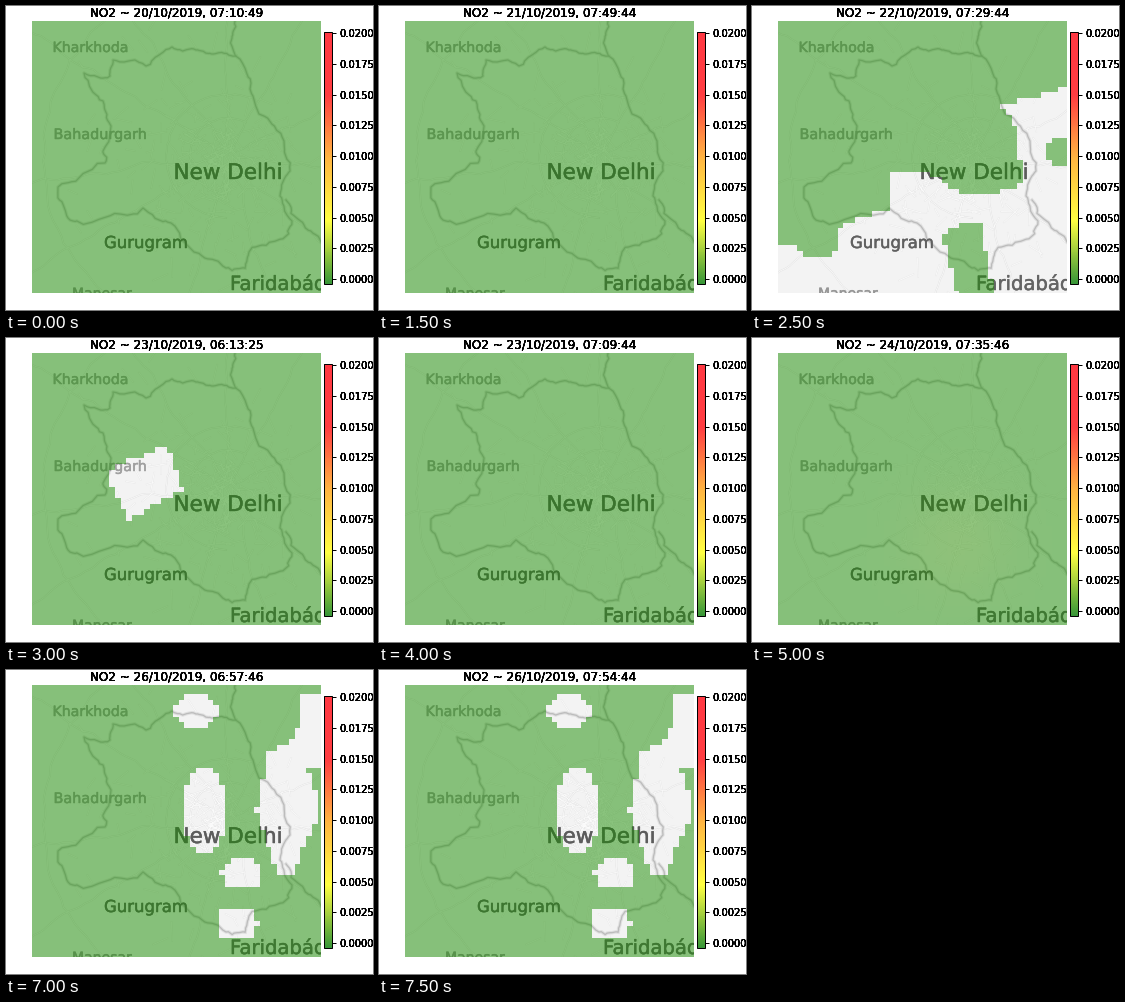
A matplotlib script that plays this animation: 367x304 px, repeating every 8 s.

```python
import numpy as np
import matplotlib.pyplot as plt
from matplotlib.animation import FuncAnimation
from matplotlib.cm import ScalarMappable
from matplotlib.colors import LinearSegmentedColormap, Normalize
from matplotlib.path import Path
from matplotlib.patheffects import withStroke

W, H, DPI = 367, 304, 72
X0, X1, Y0, Y1 = 26, 315, 15, 287
CENTRE = np.array([222, 150])

plt.rcParams["font.family"] = "DejaVu Sans"
fig = plt.figure(figsize=(W / DPI, H / DPI), dpi=DPI, facecolor="white")
rng = np.random.default_rng(7)


def px_axes(x, y, w, h):
    return fig.add_axes([x / W, 1 - (y + h) / H, w / W, h / H])


def heavy(x, y, s, **kw):
    """Stacked copies of a label harden its soft edges."""
    return [fig.text(x / W, 1 - y / H, s, color="black", **kw) for _ in range(7)]


def gray(v):
    return (v / 255,) * 3


# ---- base map ----
ax = px_axes(X0, Y0, X1 - X0, Y1 - Y0)
ax.set_xlim(X0, X1)
ax.set_ylim(Y1, Y0)
ax.axis("off")
ax.fill([X0, X1, X1, X0], [Y0, Y0, Y1, Y1], color=gray(243), lw=0)


def wander(pts, amp, depth=3):
    """Roughen a polyline by repeated midpoint displacement."""
    pts = np.array(pts, float)
    for _ in range(depth):
        a, b = pts[:-1], pts[1:]
        reach = np.hypot(*(b - a).T)[:, None]
        mid = (a + b) / 2 + rng.normal(0, amp, a.shape) * reach
        pts = np.vstack([np.stack([a, mid], 1).reshape(-1, 2), pts[-1:]])
    return pts


def cased(pts, edge, edge_lw, core, core_lw, z=1):
    for tone, lw, dz in ((edge, edge_lw, 0), (core, core_lw, 0.5)):
        ax.plot(*np.transpose(pts), color=gray(tone), lw=lw, zorder=z + dz,
                solid_joinstyle="round")


def polar(r, angle):
    return np.stack([r * np.cos(angle), r * np.sin(angle)], -1)


# streets: short pieces scattered around the centre, on a few bearings
for spread, count in ((30, 170), (70, 150)):
    for mid in rng.normal(CENTRE + (0, 10), spread, (count, 2)):
        step = polar(rng.uniform(3, 10), rng.choice([0.35, 1.1, 1.9, 2.7])
                     + rng.normal(0, 0.2))
        cased([mid - step, mid + step], 232, 1.5, 253, 0.7)

# trunk roads: spokes and rings
for angle in np.linspace(0, 2 * np.pi, 11, endpoint=False) + 0.2:
    r = np.linspace(10, 260, 6)[:, None]
    spoke = CENTRE + r * polar(1, angle + rng.normal(0, 0.1))
    cased(wander(spoke, 0.05), 226, 1.6, 252, 0.7)
for radius in (38, 62, 185):
    ring = CENTRE + polar(radius, np.linspace(1.6, 5.2, 20))
    cased(wander(ring, 0.04, 2), 226, 1.6, 252, 0.7)

# state border and river
west_side = [(230, 50), (207, 48), (190, 44), (166, 41), (140, 60), (107, 54),
             (104, 70), (78, 67), (97, 95), (105, 120), (97, 145), (99, 157),
             (52, 181), (62, 212), (100, 211), (137, 202), (165, 217),
             (188, 246), (220, 262), (239, 262)]
east_side = [(239, 262), (243, 246), (265, 236), (286, 215), (274, 190),
             (284, 165), (278, 135), (253, 108), (241, 68), (226, 32), (229, 15)]
river = [(280, 194), (298, 219), (315, 236)]
for course in (west_side, east_side, river):
    cased(wander(course, 0.09), 224, 3.4, 188, 1.3, z=3)

for s, x, y, size, tone in [
        ("Kharkhoda", 46.5, 46, 14.1, 160), ("Bahadurgarh", 47.5, 133, 14.4, 160),
        ("New Delhi", 167.5, 173, 21.5, 92), ("Gurugram", 98, 242, 16.5, 96),
        ("Faridabád", 224, 284, 19.6, 100), ("Manesar", 66, 292, 14, 150)]:
    bold = withStroke(linewidth=0.5, foreground=gray(tone))
    ax.text(x, y, s, size=size, color=gray(tone), va="baseline", clip_on=True,
            zorder=5, path_effects=[bold])

# ---- measured layer, sampled on coarse cells ----
gx, gy = np.meshgrid(np.arange(X0, X1) + 0.5, np.arange(Y0, Y1) + 0.5)
CW, CH = 5.8, 5.67
cx = (np.floor((gx - 27.6) / CW) + 0.5) * CW + 27.6
cy = (np.floor((gy - 18.3) / CH) + 0.5) * CH + 18.3
cells = np.column_stack([cx.ravel(), cy.ravel()])


def area(*pts):
    return Path(pts).contains_points(cells).reshape(gx.shape)


def blob(x, y, rx, ry):
    return np.abs((cx - x) / rx) ** 2.5 + np.abs((cy - y) / ry) ** 2.5 < 1


def layer(gap=False, tint=0.0):
    """Half-clear green with gaps and a warm haze in the south."""
    warm = tint * np.exp(-((cx - 205) / 55) ** 2 - ((cy - 205) / 55) ** 2)
    rgba = np.zeros(gx.shape + (4,))
    rgba[..., 0] = 25 / 255 + warm
    rgba[..., 1] = 141 / 255 + warm * 0.2
    rgba[..., 3] = np.where(gap, 0, 0.5)
    return rgba


south = area((20, 239), (42, 240), (52, 253), (84, 247), (90, 218), (135, 204),
             (140, 166), (170, 163), (210, 188), (238, 190), (270, 178),
             (266, 128), (250, 100), (320, 80), (320, 295), (20, 295))
south &= ~area((190, 230), (213, 217), (228, 219), (243, 295), (207, 295))
south &= ~blob(308, 146, 13, 15)
west = area((100, 134), (160, 106), (177, 152), (121, 182))
spots = (blob(190, 41, 21, 15) | blob(199, 140, 20, 41)
         | blob(235, 204, 19, 15) | blob(231, 254, 20, 16)
         | area((297, 25), (320, 25), (320, 95), (302, 100), (311, 125),
                (310, 150), (286, 206), (272, 206), (250, 140), (262, 82),
                (290, 70)))

clear, hazy = layer(), layer(tint=0.07)
# October day: passes as (time, layer)
passes = {
    20: [("07:10:49", clear), ("08:09:44", clear)],
    21: [("06:51:49", clear), ("07:49:44", clear)],
    22: [("06:32:25", layer(south)), ("07:29:44", layer(south))],
    23: [("06:13:25", layer(west)), ("06:14:44", layer(west)),
         ("07:09:44", clear), ("08:54:25", clear)],
    24: [("07:35:46", hazy), ("08:34:44", hazy)],
    25: [("07:16:46", clear), ("08:14:44", clear)],
    26: [("06:57:46", layer(spots)), ("07:54:44", layer(spots))],
}
steps = [(f"NO2 ~ {day}/10/2019, {time}", data)
         for day, day_passes in passes.items() for time, data in day_passes]

cover = ax.imshow(clear, extent=(X0, X1, Y1, Y0), aspect="auto",
                  interpolation="nearest", zorder=10)
title = heavy((X0 + X1) / 2, Y0 - 5, "", size=12, ha="center", va="baseline")

# ---- colour bar ----
LOW, HIGH = -0.0004, 0.0201
BAR_X, BAR_Y, BAR_W, BAR_H = 318, 26, 8, 252
cmap = LinearSegmentedColormap.from_list(
    "no2", [(0.22, 0.59, 0.22), (1, 1, 0.26), (1, 0.71, 0.26),
            (1, 0.24, 0.26), (1, 0.22, 0.26)])
ticks = np.arange(9) * 0.0025
bar = fig.colorbar(ScalarMappable(Normalize(LOW, HIGH), cmap),
                   cax=px_axes(BAR_X, BAR_Y, BAR_W, BAR_H), ticks=ticks)
bar.ax.set_yticklabels([])
bar.ax.tick_params(width=1)
bar.outline.set_linewidth(1)
for v in ticks:
    y = BAR_Y + BAR_H * (HIGH - v) / (HIGH - LOW)
    heavy(BAR_X + BAR_W + 7, y, f"{v:.4f}", size=10, va="center_baseline")


def draw(i):
    caption, data = steps[i]
    for t in title:
        t.set_text(caption)
    cover.set_data(data)
    return [*title, cover]


anim = FuncAnimation(fig, draw, frames=len(steps), interval=500,
                     repeat=True, repeat_delay=0, blit=False)
plt.show()
```
